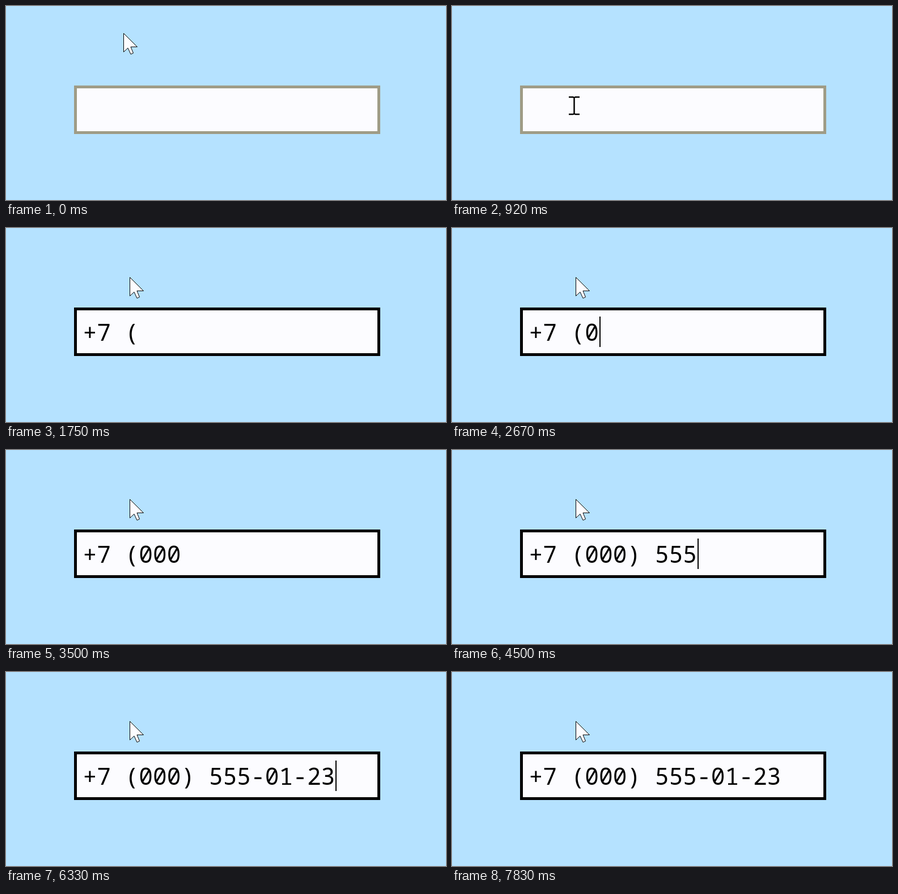
Write an HTML page that moves like this. It is 776x344 px and loops after 8000 ms.

```html
<!DOCTYPE html>
<html lang="en">
<head>
<meta charset="utf-8">
<title>Masked phone input</title>
<style>
  html, body { margin: 0; height: 100%; overflow: hidden; background: #b5e2ff; }
  svg { display: block; }
  text { font: 41.2px "Noto Sans Mono", monospace; white-space: pre; }
</style>
</head>
<body>
<svg width="776" height="344" viewBox="0 0 776 344">
  <rect id="field" x="122.5" y="143.5" width="535" height="81" fill="#fcfcff" stroke-width="5"/>
  <text id="value" x="135.5" y="200"></text>
  <rect id="caret" y="157" width="2" height="54"/>
  <path id="arrow" d="M.5 .5V33.5L8 26.5 13 37.5 17.5 35.5 13 24.5H24.5Z" fill="#fcfcff" stroke="#000"/>
  <path id="beam" d="M-9.5-15.5H-2L0-14.5 2-15.5H9.5M-9.5 15H-2L0 14 2 15H9.5M0-14.5V14" fill="none" stroke="#000" stroke-width="2.5"/>
</svg>
<script>
const LOOP = 8000, FOCUS = 1170, BLINK = 500;
const START = 135.5, ADVANCE = 24.72;
const [field, value, caret, arrow, beam] =
  ["field", "value", "caret", "arrow", "beam"].map(id => document.getElementById(id));

// [time, pointer shape, x, y]
const pointer = [
  [0, arrow, 207, 48], [670, arrow, 215, 72], [750, arrow, 212, 106],
  [830, beam, 207.5, 150], [920, beam, 215.5, 177],
  [1330, arrow, 228, 81], [1420, arrow, 218, 87]
];

// Each group's first digit shows unformatted until the mask adds its separator.
const typed = [
  [0, ""], [FOCUS, "+7 ("],
  [2670, "+7 (0"], [2830, "+7 (00"], [3000, "+7 (000"],
  [3830, "+7 (0005"], [4000, "+7 (000) 5"], [4330, "+7 (000) 55"], [4500, "+7 (000) 555"],
  [5330, "+7 (000) 5550"], [5420, "+7 (000) 555-0"], [5500, "+7 (000) 555-01"],
  [6170, "+7 (000) 555-012"], [6250, "+7 (000) 555-01-2"], [6330, "+7 (000) 555-01-23"]
];

const latest = (steps, t) => steps.findLast(step => step[0] <= t);

function caretVisible(t, since) {
  if (t < FOCUS) return false;
  if (since === FOCUS) return t < 1750 || t >= 2250;
  return Math.floor((t - since) / BLINK) % 2 === 0;
}

function draw(now) {
  const t = now % LOOP;
  const [since, text] = latest(typed, t);
  const [, shape, x, y] = latest(pointer, t);

  field.setAttribute("stroke", t < FOCUS ? "#9f9c86" : "#000");
  value.textContent = text;
  caret.setAttribute("x", Math.ceil(START + text.length * ADVANCE));
  caret.style.display = caretVisible(t, since) ? "" : "none";
  for (const p of [arrow, beam]) p.style.display = p === shape ? "" : "none";
  shape.setAttribute("transform", `translate(${x} ${y})`);
  requestAnimationFrame(draw);
}
draw(performance.now());
</script>
</body>
</html>
```
